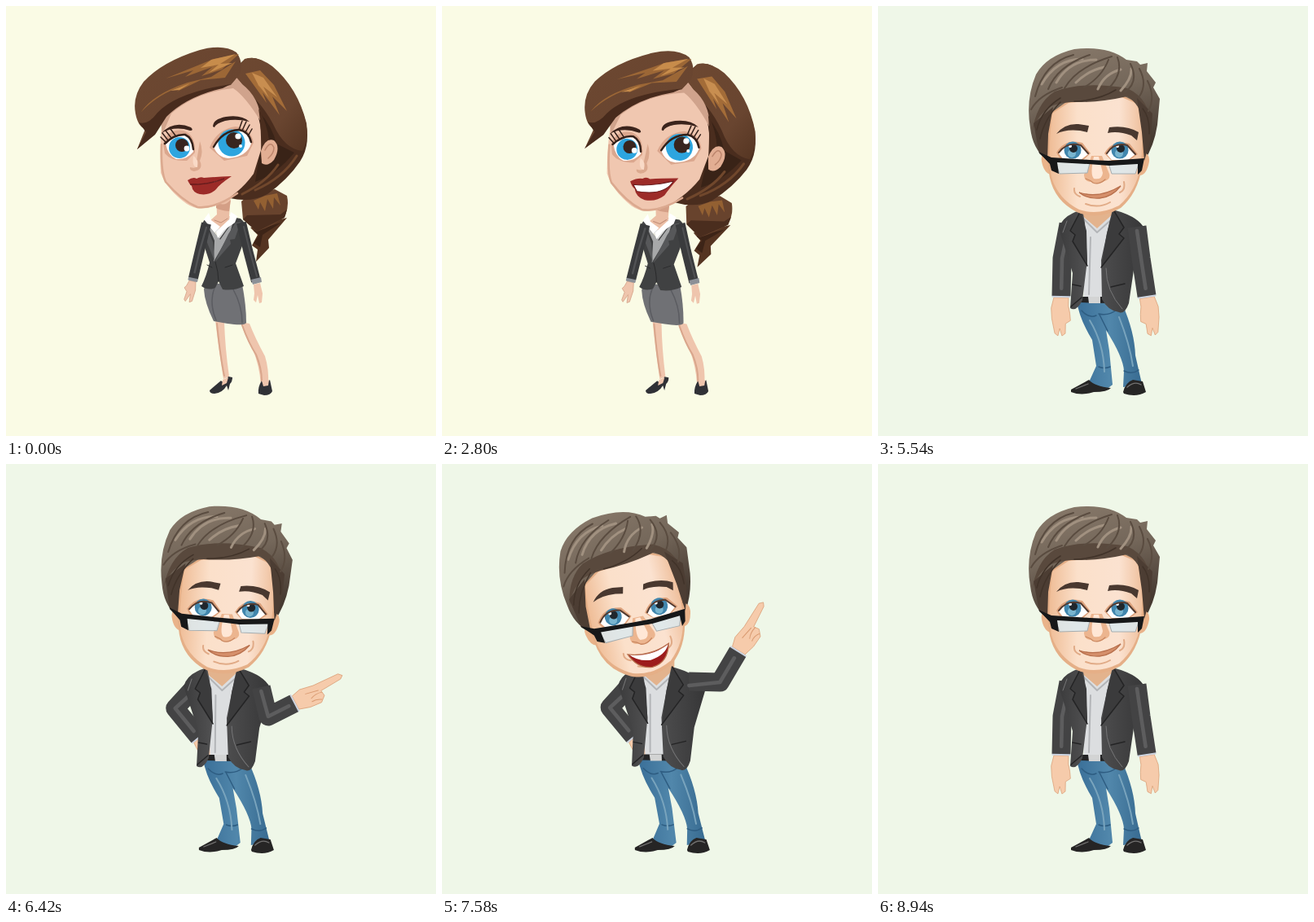
Animation, 528 px wide and 528 px high, one loop 9040 ms. Source, as an HTML page:

```html
<!DOCTYPE html>
<html lang="en">
<head>
<meta charset="utf-8">
<title>Two presenters</title>
<style>
  html, body { margin: 0; width: 100%; height: 100%; overflow: hidden; background: #fafbe5; }
  svg { display: block; width: 100vw; height: 100vh; }
  .line { fill: none; stroke-linecap: round; stroke-linejoin: round; }
  .sleeve { fill: none; stroke-linejoin: round; }
</style>
</head>
<body>
<svg viewBox="0 0 528 528">
  <defs>
    <linearGradient id="brown" x2="1" y2="1"><stop stop-color="#6d4831"/><stop offset=".65" stop-color="#694530"/><stop offset="1" stop-color="#553522"/></linearGradient>
    <linearGradient id="ash" x2=".3" y2="1"><stop stop-color="#897a6b"/><stop offset=".5" stop-color="#74675a"/><stop offset="1" stop-color="#463a31"/></linearGradient>
    <linearGradient id="face"><stop stop-color="#efbd97"/><stop offset=".3" stop-color="#fbe0ca"/><stop offset=".75" stop-color="#fbe2d0"/><stop offset="1" stop-color="#efc09d"/></linearGradient>
    <linearGradient id="coat"><stop stop-color="#3b3b3c"/><stop offset=".35" stop-color="#535354"/><stop offset="1" stop-color="#363637"/></linearGradient>
    <linearGradient id="denim"><stop stop-color="#3a6f98"/><stop offset=".5" stop-color="#5187ab"/><stop offset="1" stop-color="#386b91"/></linearGradient>
  </defs>

  <g id="woman">
    <g id="tail">
      <path fill="#553421" d="M300 272 345 260 322 287 323 297 307 314 309 299 302 294 309 281Z"/>
      <path fill="#3d2417" d="M304 276 338 266 315 281 312 296 304 291 311 281Z"/>
      <path fill="#68432d" d="M289 240Q298 231 312 229L330 225 345 233Q348 247 342 259 328 270 308 277L291 262Z"/>
      <path fill="#4a2d1e" d="M291 262 296 257 337 256 345 250 342 260 308 277Z"/>
      <path fill="#936032" d="M304 239 310 250 312 241 318 252 321 237 328 249 329 235 337 245 333 230 318 233Z"/>
    </g>
    <g id="womanBody">
      <g fill="#efc5ad">
        <path d="M257 386 268 388Q269 420 274 455L267 458Q261 420 257 386Z"/>
        <path d="M288 388 299 390Q306 408 318 430 323 446 322 465L313 465Q311 440 303 422 294 407 288 388Z"/>
      </g>
      <path class="line" stroke="#d9a68c" stroke-width="2" d="M259 390Q263 430 268 454M290 392Q298 414 307 428 314 445 314 460"/>
      <path fill="#303136" d="M250 472Q258 465 264 460 267 464 273 455L278 456Q278 461 275 464L273 472 271 466Q266 475 256 476 250 476 250 472Z"/>
      <path fill="#303136" d="M310 476Q309 468 314 460 317 467 324 459L327 473Q325 478 317 478Z"/>
      <path fill="#efc5ad" d="M266 459 273 456 271 463 265 466ZM314 460 323 459 322 466 316 467Z"/>
      <path fill="#707175" d="M245 340 290 342Q295 367 295 389 293 393 272 390L255 387Q244 365 243 348Z"/>
      <path class="line" stroke="#5b5c61" stroke-width="1.5" d="M256 346Q249 364 258 386M279 348Q290 368 290 389"/>
      <path fill="#ebbea5" d="M258 232 276 232 274 258 282 263 262 286 250 264 259 256Z"/>
      <path fill="#d49f86" d="M258 240Q267 248 276 238L274 252Q263 251 258 248Z"/>
      <path class="line" stroke="#c28e78" d="M256 263 264 266 272 261"/>
      <path fill="#404142" d="M246 260Q237 269 240 284L250 315Q246 332 240 344 248 350 257 346L261 338 266 348Q280 350 292 344L282 316 294 284Q298 269 288 261L276 259 257 288Z"/>
      <path fill="#a7a8a9" d="M246 265 256 288 255 314 275 279 279 264 263 287Z"/>
      <path fill="#d8d9d8" d="M251 267 262 286 278 264 264 275Z"/>
      <path fill="#fff" d="M249 254 243 262 256 278 263 271 252 263ZM276 253 284 258 281 266 268 275 260 285 258 277 274 262Z"/>
      <path fill="#57585a" d="M244 264 243 281 248 284 246 288 256 313 254 290ZM282 266 273 280 256 315 276 292 275 287 281 286 288 265Z"/>
      <path class="line" stroke="#292a2b" d="M257 314Q261 327 261 338M247 318 253 321M269 321 278 318"/>
      <path class="sleeve" stroke="#3a3b3d" stroke-width="12" d="M289 266 297 300 307 338"/>
      <path class="line" stroke="#505153" stroke-width="2" d="M292 271 300 303 308 332"/>
      <path fill="#8c9097" d="M301 336 313 333 314 339 303 342Z"/>
      <path fill="#efc5ad" d="M304 342 312 340 315 353 314 364 311 365 309 355 307 364 304 361 305 353Z"/>
      <g id="womanArm"></g>
    </g>
    <g id="womanHead">
      <path fill="#4a2d1e" d="M288 70Q298 60 312 66 352 91 366 135 376 168 361 191 346 213 321 231 301 242 275 236L296 200Z"/>
      <path fill="url(#brown)" d="M280 94Q283 74 293 65 308 60 327 74 358 100 369 144 372 164 364 178 342 176 328 145 310 111 280 94Z"/>
      <path fill="#392317" d="M310 129Q327 148 332 169L354 180Q332 207 306 216L311 184Z"/>
      <path class="line" stroke="#70472c" stroke-width="3" d="M357 184Q340 211 306 226M334 195Q320 216 290 231"/>
      <path fill="#f0c7b0" d="M192 137Q188 170 190 205 198 226 222 243 237 253 258 245 286 231 304 206L314 174Q316 125 283 88L235 103Z"/>
      <path fill="#d0a38c" d="M190 142Q206 112 284 89L290 96Q312 113 313 142 294 111 279 101 233 106 203 132L192 158Z"/>
      <path class="line" stroke="#dba98f" stroke-width="2.5" d="M191 170Q190 203 196 216 216 239 235 247 257 249 284 230"/>
      <path fill="#4a2d1e" d="M310 126Q321 145 323 165L313 189Q314 150 310 126Z"/>
      <path fill="#e2ae93" d="M313 178Q319 161 329 165 338 173 329 189 321 198 314 193Z"/>
      <path class="line" stroke="#bd866d" stroke-width="1.5" d="M318 177Q325 164 329 174 329 181 322 187"/>
      <path fill="url(#brown)" d="M171 151 161 176 184 156Q193 136 213 119 240 103 276 97L287 84Q292 69 283 57 267 46 238 54 192 68 169 93 155 111 159 132 162 148 171 151Z"/>
      <path fill="#482b1d" d="M163 143Q174 147 186 131 210 106 276 96L266 101Q222 111 197 136L183 158 161 176 172 155Z"/>
      <path fill="#9c6736" d="M166 130Q181 108 223 94L252 87 282 68 269 88 239 91 210 105 218 98Q188 107 166 130ZM196 89 255 65 286 59 265 78 275 75 240 86 253 75 220 87 230 79Z"/>
      <path fill="#c78c4b" d="M252 66 282 59 263 71 278 70 249 82 261 72 239 76ZM202 104 226 95 213 103Z"/>
      <path fill="#a36c38" d="M294 83 312 79 329 97 345 129 327 111 336 134 315 106 320 119Z"/>
      <path fill="#c88e50" d="M302 82 316 88 333 112 316 99 323 113 309 96 314 105Z"/>
      <path fill="#dba78e" d="M193 169Q199 150 218 153 233 158 232 180L222 190Q203 191 195 181ZM250 174Q259 151 282 148 301 150 304 168L296 184 268 190Z"/>
      <path fill="#fff" d="M196 169Q204 159 220 158 231 164 230 179 222 189 209 188 199 184 196 169ZM255 173Q267 153 285 152 299 153 301 169 296 185 273 187 260 186 255 173Z"/>
      <g fill="#2da5df"><circle cx="213" cy="174" r="13"/><circle cx="277" cy="168" r="16.5"/></g>
      <g fill="#38251f"><circle cx="216" cy="171" r="8"/><circle cx="280" cy="165" r="10"/></g>
      <g fill="#fff"><circle cx="222" cy="175" r="3.4"/><circle cx="285" cy="160" r="3.6"/><circle cx="288" cy="172" r="2"/></g>
      <path class="line" stroke="#332019" stroke-width="2.5" d="M195 169Q207 157 220 158 229 162 230 176M255 173Q266 153 286 152 298 154 301 167"/>
      <path class="line" stroke="#332019" stroke-width="1.5" d="M197 168 190 161M199 165 192 156M203 162 196 153M208 159 202 151M286 152 290 141M290 153 295 142M294 155 299 146M298 158 302 151"/>
      <path fill="#3b241c" d="M191 156Q206 140 227 149 231 153 226 153 207 147 191 156ZM254 148Q254 139 270 136 289 133 299 142 283 138 269 141 258 144 256 149Z"/>
      <path fill="#dba98f" d="M238 166Q243 179 238 190 243 201 231 203 225 202 226 198 237 201 234 191Z"/>
      <path fill="#f9dac7" d="M230 184Q237 188 235 198 228 198 230 184Z"/>
      <path id="lips" fill="#9c2b28"/>
      <path id="womanTeeth" fill="#fff" stroke="#671a1b"/>
    </g>
  </g>

  <g id="man">
    <g id="manBody">
      <g id="leftArm"></g>
      <path fill="url(#denim)" d="M244 362Q247 384 263 410L268 442 258 464 280 471 288 465 284 423 280 398Q301 431 302 448L301 468 324 464 316 429Q315 400 300 366Z"/>
      <path class="line" stroke="#2e5d82" stroke-width="1.5" d="M250 374Q259 384 268 380M271 378Q283 381 293 373M271 443Q278 446 285 443M302 448Q312 453 320 447M282 399 272 379"/>
      <path class="line" stroke="#79a4bd" stroke-width="2" d="M260 386Q277 414 278 449M296 382Q309 415 313 442"/>
      <path fill="#262525" d="M237 471 259 459Q266 467 286 469 282 474 265 474 250 479 237 474ZM301 474Q304 462 313 459L325 461 329 474Q317 481 302 476Z"/>
      <path class="line" stroke="#727170" stroke-width="1.3" d="M243 470 258 464M306 468Q315 460 323 465"/>
      <path fill="#e3b38d" d="M248 240 292 240 291 260 268 277 250 260Z"/>
      <path fill="#dcdee0" d="M249 256 269 273 290 254 289 302 275 361 253 361Z"/>
      <path class="line" stroke="#b3b5b8" stroke-width="2" d="M252 261 269 278 288 261M261 284 259 354"/>
      <path fill="#242425" d="M248 357 279 357 280 365 248 364Z"/>
      <path fill="#d3d4d4" d="M258 357H273V365H259Z"/>
      <path fill="url(#coat)" d="M251 250Q226 257 222 273L239 328 236 371Q244 376 251 361L257 312 254 266ZM288 250Q324 259 329 278L314 324 308 365Q303 379 296 376 282 374 275 360L274 312 284 266Z"/>
      <path fill="#3b3b3c" d="M249 251 236 276 242 281 239 289 257 319 256 276ZM289 250 302 272 296 280 302 285 274 321 281 279Z"/>
      <path class="line" stroke="#242425" stroke-width="1.5" d="M249 251 236 276 242 281 239 289 257 319M289 250 302 272 296 280 302 285 274 321M239 342 249 344M286 345 303 341M237 369 250 358"/>
      <path class="line" stroke="#767677" d="M232 264 227 278M280 322Q280 350 300 372"/>
      <g id="rightArm"></g>
    </g>
    <g id="manHead">
      <path fill="url(#ash)" d="M206 188Q190 175 187 150 181 115 194 84 207 61 241 53 282 48 305 66L318 68 322 72 331 70 330 80 341 94 338 100 346 114 343 146Q339 172 327 190L309 125 216 133Z"/>
      <path fill="#e9b38a" d="M211 181Q199 179 201 191 204 206 213 207ZM323 180Q334 179 333 191 330 207 322 208Z"/>
      <path fill="#e5af87" d="M210 133Q205 181 211 211 217 239 244 253 270 264 298 248 319 230 324 198 331 153 321 120L299 109 231 118Z"/>
      <path fill="url(#face)" d="M214 132Q208 181 213 210 221 237 247 250 270 258 296 245 317 227 322 198 329 153 318 120L299 112 234 119Z"/>
      <path fill="#59493d" d="M189 157Q193 137 208 127 210 121 237 118 271 119 306 111 322 121 326 142L330 174 333 160Q340 117 306 101 252 92 217 105 194 119 189 157Z"/>
      <path fill="#4c3d33" d="M191 144 215 124 209 157 208 190 198 181ZM318 113 337 132 335 163 327 190 324 155Z"/>
      <g class="line">
        <path stroke="#a19180" stroke-width="3" d="M201 96Q219 65 251 65M219 94Q235 66 268 66M243 94Q258 79 278 75M270 102Q278 83 298 78M298 104Q312 89 311 77"/>
        <path stroke="#5a4c40" stroke-width="2" d="M193 111Q204 69 240 60M209 102Q221 73 260 60M229 101Q244 75 287 62M253 100Q275 87 283 66M281 103Q302 84 294 63M303 106Q321 93 310 71M321 111Q331 96 321 77M332 129Q341 112 331 92M188 127Q198 109 226 100"/>
        <path stroke="#413329" stroke-width="1.5" d="M195 152Q201 127 224 113M199 163Q204 139 224 118M241 117Q271 116 292 103M325 126Q334 137 333 157"/>
      </g>
      <g id="manBrows" fill="#49382f">
        <path d="M219 157Q229 144 246 145L259 147 257 155 248 153Q230 151 219 157ZM282 156 284 149Q305 146 320 155L318 165 311 159Q295 153 282 156Z"/>
      </g>
      <path fill="#dda27c" d="M219 180Q230 162 251 168L261 181 251 190H225ZM278 181Q288 163 309 169L319 182 308 190H287Z"/>
      <path fill="#fff" d="M222 181Q232 166 249 171L258 182 249 189H228ZM281 182Q290 167 306 171L316 182 307 189H287Z"/>
      <g fill="#4186ad"><circle cx="239" cy="177" r="10.5"/><circle cx="297" cy="177" r="10.5"/></g>
      <g fill="#79b5cf"><circle cx="238" cy="181" r="5"/><circle cx="296" cy="181" r="5"/></g>
      <g fill="#20272d"><circle cx="240" cy="175" r="5"/><circle cx="298" cy="175" r="5"/></g>
      <g fill="#fff"><circle cx="236" cy="172" r="2"/><circle cx="294" cy="172" r="2"/></g>
      <path class="line" stroke="#543b30" stroke-width="2" d="M222 180Q232 166 249 171L258 181M281 181Q290 167 306 171L316 182"/>
      <path fill="#ecb58f" d="M262 184Q257 200 253 207 253 216 262 216 270 221 278 215 286 213 284 206L275 184Z"/>
      <path fill="#ffe7d6" d="M265 185Q260 207 265 212 275 214 276 205L271 185Z"/>
      <path class="line" stroke="#c98760" stroke-width="1.3" d="M255 212Q261 214 264 217 271 220 279 213"/>
      <path fill="#dce9ee" fill-opacity=".85" stroke="#a5adb0" d="M218 191 260 193 257 205 223 206ZM283 193 321 191 316 206 287 206Z"/>
      <path fill="#171819" d="M197 179 213 186 260 189 283 190 327 187 324 202 319 207 319 194 284 196 258 194 220 192 222 206 213 202 211 194Z"/>
      <path class="line" stroke="#e1ab87" stroke-width="2" d="M241 224Q240 231 248 234M302 216Q304 226 297 229M255 243Q271 249 285 241"/>
      <path id="manMouth" fill="#9d1c1c" stroke="#b8704d" stroke-width="1.3"/>
      <path id="manTeeth" fill="#fff"/>
    </g>
  </g>
</svg>
<script>
const LOOP = 9040, SWITCH = 5140;
const $ = id => document.getElementById(id);

// Eased values at time t; each key is [time, ...values].
function at(t, keys) {
  const next = keys.findIndex(key => key[0] > t);
  if (next < 1) return (next ? keys[keys.length - 1] : keys[0]).slice(1);
  const a = keys[next - 1], b = keys[next];
  const x = (t - a[0]) / (b[0] - a[0]), k = x * x * (3 - 2 * x);
  return a.slice(1).map((v, i) => v + (b[i + 1] - v) * k);
}

// Blends two paths with the same commands.
function morph(from, to, k) {
  const ends = to.match(/[\d.]+/g);
  let i = 0;
  return from.replace(/[\d.]+/g, n => (+n + (ends[i++] - n) * k).toFixed(2));
}

const HANDS = {
  woman: {
    width: 12, coat: '#3a3b3d', shine: '#525355', skin: '#efc5ad', edge: '#d39f85',
    cuff: '#8c9097', cuffSize: 5,
    open: 'M4-4 14-6 28-5 30-2 20-1 30 3 28 5 18 4 14 8 11 6 4 4Z',
    point: 'M4-4 12-7 20-5 23 0 21 4 32 7 32 10 19 9 9 8 4 4Z',
    crease: 'M14-5 18-1M16 3 21 4'
  },
  man: {
    width: 23, coat: '#434344', shine: '#5d5d5e', skin: '#f6cbab', edge: '#d99b72',
    cuff: '#ccd3df', cuffSize: 3,
    open: 'M2-9 15-12 28-11 46-7 49-3 40-1 49 2 46 6 34 6 30 12 21 11 12 9 2 9Z',
    point: 'M2-9 14-12 31-9 65-8 69-4 65-1 37 1 38 8 31 14 16 13 2 9Z',
    crease: 'M18-4 34-1M22 4Q29 1 37 3M21 8Q27 7 33 11'
  }
};

function makeArm(id, style, flip = 1) {
  const s = HANDS[style];
  $(id).innerHTML = `
    <g><g transform="scale(1 ${flip})">
      <path fill="${s.skin}" stroke="${s.edge}" stroke-width=".7"/>
      <path class="line" stroke="${s.edge}" d="${s.crease}"/>
      <rect x="-1" y="${-s.width / 2}" width="${s.cuffSize}" height="${s.width}" rx="1" fill="${s.cuff}"/>
    </g></g>
    <path class="sleeve" stroke="${s.coat}" stroke-width="${s.width}" stroke-linecap="butt"/>
    <path class="line" stroke="${s.shine}" stroke-width="${s.width / 5}"/>`;
  const [hand, sleeve, shine] = $(id).children;
  const [palm, crease] = hand.firstElementChild.children;
  return ([sx, sy, ex, ey, wx, wy, pointing]) => {
    const angle = Math.atan2(wy - ey, wx - ex) * 180 / Math.PI;
    const limb = `M${sx} ${sy}L${ex} ${ey} ${wx} ${wy}`;
    sleeve.setAttribute('d', limb);
    shine.setAttribute('d', `M${sx} ${sy + 5}L${ex} ${ey} ${ex + (wx - ex) * .8} ${ey + (wy - ey) * .8}`);
    hand.setAttribute('transform', `translate(${wx} ${wy}) rotate(${angle})`);
    palm.setAttribute('d', pointing > .5 ? s.point : s.open);
    crease.style.display = pointing > .5 ? '' : 'none';
  };
}

const setWomanArm = makeArm('womanArm', 'woman');
const setLeftArm = makeArm('leftArm', 'man', -1);
const setRightArm = makeArm('rightArm', 'man');

// Shoulder, elbow and wrist positions, then whether the finger points.
const womanPose = {
  rest: [246, 267, 238, 300, 230, 334, 0],
  up: [245, 268, 218, 289, 197, 262, 1],
  left: [247, 268, 252, 303, 224, 303, 1]
};
const leftPose = {
  rest: [234, 268, 226, 310, 225, 356, 0],
  hip: [239, 270, 211, 300, 239, 335, 0]
};
const rightPose = {
  rest: [318, 271, 323, 310, 330, 356, 0],
  side: [317, 274, 325, 310, 357, 294, 1],
  up: [309, 268, 347, 269, 370, 232, 1]
};

function lean(id, [shift, drop]) {
  $(id).setAttribute('transform',
    `translate(0 478) matrix(1 0 ${-shift / 218} ${1 - drop / 218} 0 0) translate(0 -478)`);
}

function tilt(id, [dx, dy, turn], pivot) {
  $(id).setAttribute('transform', `translate(${dx} ${dy}) rotate(${turn} ${pivot})`);
}

function drawWoman(t) {
  const { rest, up, left } = womanPose;
  const head = at(t, [[0, 0, 0, 0], [240, 0, 0, 0], [880, 11, 4, 4], [1400, 7, 4, 0], [1840, 7, 4, 0],
    [2400, 14, 5, 5], [2880, 10, 4, 3], [3320, 0, 1, -1], [3680, 10, 4, 3], [3960, 9, 5, 0],
    [4320, 9, 5, 0], [4560, 8, 4, 2], [4960, 0, 0, 0]]);
  tilt('womanHead', head, '255 245');
  tilt('tail', head, '255 245');
  lean('womanBody', at(t, [[240, 0, 0], [880, 3, 2], [2000, 3, 2], [2500, 6, 2], [3120, 1, 1],
    [3680, 8, 3], [4320, 8, 3], [4960, 0, 0]]));
  setWomanArm(at(t, [[400, ...rest], [960, ...up], [1920, ...up], [2480, ...rest],
    [3120, ...rest], [3680, ...left], [4320, ...left], [4880, ...rest]]));
  const [smile] = at(t, [[320, 0], [720, 1], [4400, 1], [4800, 0]]);
  $('lips').setAttribute('d', morph(
    'M223 214Q230 209 234 212 239 209 243 211 255 210 277 209 262 219 258 225 250 233 238 231 229 229 228 221 225 219 223 214Z',
    'M219 213Q228 208 234 209 239 206 243 209 258 207 278 206 268 218 262 228 252 237 238 235 227 232 225 222 221 219 219 213Z', smile));
  $('womanTeeth').setAttribute('d', morph(
    'M226 219Q245 220 268 212 250 220 228 219Z',
    'M223 217Q246 218 272 210 262 229 228 225Z', smile));
}

function drawMan(t) {
  const { rest, side, up } = rightPose, { rest: down, hip } = leftPose;
  tilt('manHead', at(t, [[5800, 0, 0, 0], [6320, 0, 0, 2.5], [6680, 0, 0, 2.5], [7320, -14, 3, -13.5],
    [7560, -13, 3, -13], [7800, -13, 3, -13], [8480, 0, 0, 0]]), '265 250');
  lean('manBody', at(t, [[5800, 0, 0], [6320, -4, 0], [6680, -4, 0], [7320, -6, -1], [7800, -6, -1], [8480, 0, 0]]));
  setLeftArm(at(t, [[5800, ...down], [6280, ...hip], [8060, ...hip], [8560, ...down]]));
  setRightArm(at(t, [[5800, ...rest], [6320, ...side], [6660, ...side], [7280, ...up],
    [7760, ...up], [8180, ...side], [8560, ...rest]]));
  const [open] = at(t, [[6760, 0], [7160, 1], [7800, 1], [8200, 0]]);
  $('manBrows').setAttribute('transform', `translate(0 ${-3 * open})`);
  $('manMouth').setAttribute('d', morph(
    'M247 229Q272 237 298 221 287 235 272 236 257 237 247 229Z',
    'M246 226Q272 235 298 224 292 247 272 248 254 246 246 226Z', open));
  $('manTeeth').setAttribute('d', morph(
    'M248 230Q272 237 297 223 287 232 272 235 256 235 248 230Z',
    'M248 227Q272 236 297 225 291 237 272 239 256 237 248 227Z', open));
  $('manTeeth').style.opacity = Math.min(1, open * 2);
  $('manMouth').style.fill = open > .1 ? '#9d1c1c' : '#d58f6b';
}

function frame() {
  const t = performance.now() % LOOP, first = t < SWITCH;
  $('woman').style.display = first ? '' : 'none';
  $('man').style.display = first ? 'none' : '';
  document.body.style.background = first ? '#fafbe5' : '#eff7e8';
  if (first) drawWoman(Math.min(5040, Math.floor(t / 80) * 80));
  else drawMan(SWITCH + Math.floor((t - SWITCH) / 40) * 40);
  requestAnimationFrame(frame);
}
frame();
</script>
</body>
</html>
```
